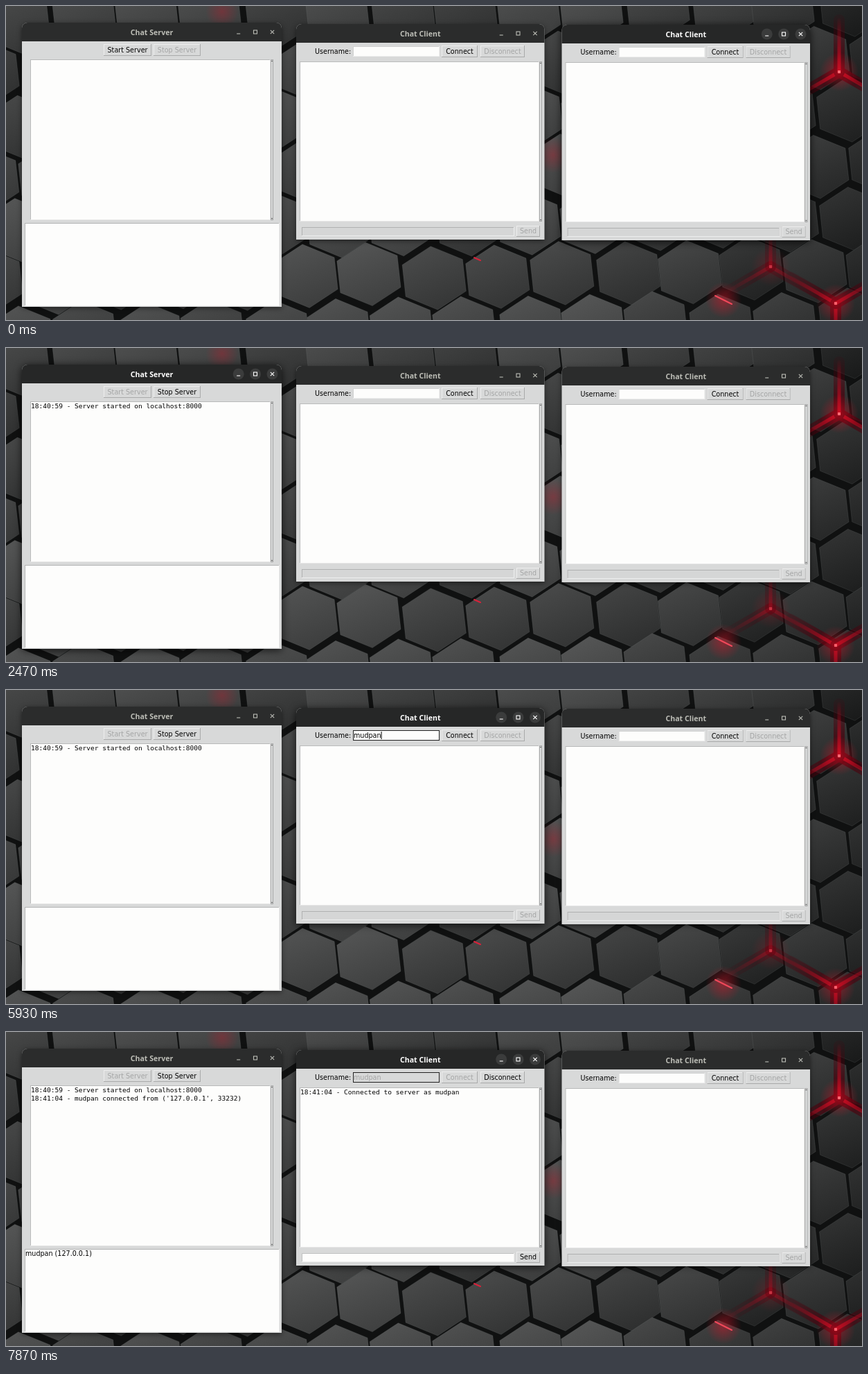
Write an HTML page with a canvas that moves like this. It is 1236 px wide and 453 px high and loops after 8000 ms.

```html
<!DOCTYPE html>
<html lang="en">
<head>
<meta charset="utf-8">
<title>Chat windows</title>
<style>
html, body { margin: 0; width: 100%; height: 100%; overflow: hidden; background: #141515; }
canvas { display: block; }
</style>
</head>
<body>
<canvas id="stage" width="1236" height="453"></canvas>
<script>
const W = 1236, H = 453, LOOP = 8000;
const USER = 'mudpan';
const SANS = '9.6px "DejaVu Sans", sans-serif';
const MONO = '9.54px "DejaVu Sans Mono", monospace';
const TITLE = 'bold 10.6px "Noto Sans", "Open Sans", sans-serif';
const FACE = '#d8d9d9', PAPER = '#fdfdfc', DIM = '#a4a5a5', INK = '#000';

// Times of the clicks and keys, in ms
const HOVER_START = 1570, PRESS_START = 1970, STARTED = 2370, FOCUS = 3230;
const FIRST_KEY = 5470, KEY_STEP = 92, LAST_KEY = FIRST_KEY + 5 * KEY_STEP;
const HOVER_CONNECT = 7000, PRESS_CONNECT = 7230, CONNECTED = 7430;

const stage = document.getElementById('stage');
let g = stage.getContext('2d');

function rect(x, y, w, h, color) {
  g.fillStyle = color;
  g.fillRect(x, y, w, h);
}

function text(str, x, y, font, color, align = 'left') {
  g.font = font;
  g.fillStyle = color;
  g.textAlign = align;
  g.fillText(str, x, y);
}

function line(x1, y1, x2, y2, color, width) {
  g.strokeStyle = color;
  g.lineWidth = width;
  g.beginPath();
  g.moveTo(x1, y1);
  g.lineTo(x2, y2);
  g.stroke();
}

// Box with a one pixel edge, light and dark sides
function bevel(x, y, w, h, fill, light, dark) {
  rect(x, y, w, h, dark);
  rect(x, y, w - 1, h - 1, light);
  rect(x + 1, y + 1, w - 2, h - 2, fill);
}

// ---- wallpaper ----
function randomizer(seed) {
  return () => (seed = (seed * 16807) % 2147483647) / 2147483647;
}

function hexagon(cx, cy, r, shade) {
  const gray = k => `rgb(${k},${k + 1},${k + 1})`;
  g.beginPath();
  for (let i = 0; i < 6; i++) {
    const a = Math.PI / 6 + i * Math.PI / 3 - 0.1;
    g.lineTo(cx + Math.cos(a) * r * 1.1, cy + Math.sin(a) * r);
  }
  g.closePath();
  const fill = g.createLinearGradient(cx - r * 0.4, cy - r, cx + r * 0.4, cy + r);
  fill.addColorStop(0, gray(shade + 8));
  fill.addColorStop(1, gray(shade - 14));
  g.fillStyle = fill;
  g.fill();
  g.strokeStyle = 'rgba(130,132,132,.18)';
  g.lineWidth = 1;
  g.stroke();
}

// Tilted honeycomb that darkens towards the right
function honeycomb() {
  const rnd = randomizer(11), dx = 92, dy = 76;
  for (let row = -5; row <= 1; row++) {
    for (let col = -10; col <= 5; col++) {
      const x = 803 + (col + (row & 1) / 2) * dx + rnd() * 8 - 4;
      const y = 386 + row * dy - col * 1.5 + rnd() * 8 - 4;
      const fade = Math.max(0, x - 850) / (W - 850);
      hexagon(x, y, 46, Math.round(60 + rnd() * 18 - 26 * fade));
    }
  }
}

function fading(x, y, r, rgb, alpha) {
  const c = g.createRadialGradient(x, y, 0, x, y, r);
  c.addColorStop(0, `rgba(${rgb},${alpha})`);
  c.addColorStop(1, `rgba(${rgb},0)`);
  return c;
}

function glow(x, y, r, alpha) {
  rect(x - r, y - r, 2 * r, 2 * r, fading(x, y, r, '215,20,40', alpha));
}

// Three lit gaps meeting in one corner
function junction(x, y, turn, power) {
  for (let i = 0; i < 3; i++) {
    const a = turn + i * Math.PI * 2 / 3;
    const x2 = x + Math.cos(a) * 75, y2 = y + Math.sin(a) * 75;
    line(x, y, x2, y2, fading(x, y, 95, '75,0,12', power), 16);
    line(x, y, x2, y2, fading(x, y, 80, '190,10,32', power), 5);
  }
  glow(x, y, 28, power * 0.6);
  rect(x - 2, y - 2, 4, 4, `rgba(255,110,120,${power})`);
}

function paintWallpaper() {
  const layer = document.createElement('canvas');
  layer.width = W;
  layer.height = H;
  const main = g;
  g = layer.getContext('2d');
  rect(0, 0, W, H, '#101111');
  honeycomb();

  g.lineCap = 'round';
  junction(1203, 95, Math.PI / 6, 0.95);
  junction(1104, 376, Math.PI / 6, 0.4);
  junction(1198, 429, Math.PI / 2, 0.85);
  glow(1036, 424, 26, 0.5);
  line(1024, 418, 1048, 430, '#f0485a', 2);
  line(676, 363, 685, 367, '#d8223a', 2);
  glow(312, 8, 24, 0.3);
  glow(790, 215, 26, 0.3);
  g = main;
  return layer;
}

// ---- widgets ----
function windowFrame(x, y, w, h, title, active) {
  g.save();
  g.shadowColor = active ? 'rgba(0,0,0,.75)' : 'rgba(0,0,0,.5)';
  g.shadowBlur = active ? 12 : 7;
  g.shadowOffsetY = 2;
  g.beginPath();
  g.roundRect(x, y, w, h, [8, 8, 0, 0]);
  g.fillStyle = FACE;
  g.fill();
  g.restore();

  g.beginPath();
  g.roundRect(x, y, w, 27, [8, 8, 0, 0]);
  g.fillStyle = active ? '#262727' : '#2b2c2c';
  g.fill();

  const ink = active ? '#fff' : '#bcbdb6';
  text(title, x + w / 2, y + 17.6, TITLE, ink, 'center');

  const cy = y + 13.5, right = x + w - 13.5;
  if (active) {
    for (let i = 0; i < 3; i++) {
      g.beginPath();
      g.arc(right - i * 24.4, cy, 8, 0, 7);
      g.fillStyle = '#3b3c3c';
      g.fill();
    }
  }
  line(right - 2.7, cy - 2.7, right + 2.7, cy + 2.7, ink, 1.1);
  line(right - 2.7, cy + 2.7, right + 2.7, cy - 2.7, ink, 1.1);
  g.strokeRect(right - 27, cy - 2.5, 5, 5);
  line(right - 51.3, cy + 2.5, right - 46.3, cy + 2.5, ink, 1.1);
}

function button(label, x, y, w, h, { enabled = true, hover = false, down = false } = {}) {
  const fill = hover ? '#ececec' : FACE;
  if (down) bevel(x, y, w, h, fill, '#c3c4c4', '#f4f4f4');
  else bevel(x, y, w, h, fill, '#ededed', '#a9aaaa');
  const shift = down ? 0.7 : 0;
  text(label, x + w / 2 + shift, y + h / 2 + 3.4 + shift / 2, SANS, enabled ? INK : DIM, 'center');
}

function logArea(x, y, w, h, lines) {
  bevel(x, y, w, h, PAPER, '#b9baba', '#e6e6e6');
  lines.forEach((s, i) => text(s, x + 1, y + 10 + i * 11.6, MONO, INK));
  const bar = x + w;
  bevel(bar, y, 4, h, '#d0d1d1', '#a9aaaa', '#a2a3a3');
  rect(bar + 1, y + 4, 2, h - 8, '#dcdddd');
  rect(bar + 1, y + 2, 2, 1, '#6d6e6e');
  rect(bar + 1, y + h - 3, 2, 1, '#6d6e6e');
}

function server(t) {
  const started = t >= STARTED, joined = t >= CONNECTED;
  windowFrame(23, 24, 375, 410, 'Chat Server', t >= PRESS_START && t < FOCUS);
  button('Start Server', 141, 55, 69, 17, {
    enabled: !started,
    hover: t >= HOVER_START && !started,
    down: t >= PRESS_START && !started
  });
  button('Stop Server', 213, 55, 68, 17, { enabled: started });

  const log = [];
  if (started) log.push('18:40:59 - Server started on localhost:8000');
  if (joined) log.push(`18:41:04 - ${USER} connected from ('127.0.0.1', 33232)`);
  logArea(35, 77, 347, 232, log);

  bevel(27, 313, 368, 120, PAPER, '#b4b5b5', '#efefef');
  if (joined) text(`${USER} (127.0.0.1)`, 28, 322.6, SANS, INK);
}

function client(dx, dy, s) {
  g.save();
  g.translate(dx, dy);
  windowFrame(419, 26, 358.5, 311, 'Chat Client', s.active);
  text('Username:', 446, 68.8, SANS, INK);

  const fill = s.joined ? FACE : PAPER;
  if (s.focused) bevel(501, 58, 125, 15, fill, '#222', '#222');
  else bevel(501, 58, 125, 15, fill, '#d0d1d1', '#eee');
  text(s.name, 502, 68.8, SANS, s.joined ? DIM : INK);
  if (s.caret) rect(502 + g.measureText(s.name).width, 60, 1, 11, INK);

  button('Connect', 629, 57, 52, 17, { enabled: !s.joined, hover: s.hover, down: s.down });
  button('Disconnect', 685, 57, 64, 17, { enabled: s.joined });
  logArea(424, 80, 346, 231, s.joined ? [`18:41:04 - Connected to server as ${USER}`] : []);

  if (s.joined) bevel(427, 319, 307, 13, PAPER, '#c0c1c1', '#efefef');
  else bevel(427, 319, 307, 13, '#d5d6d6', '#b0b1b1', '#ededed');
  button('Send', 737, 317, 34, 16, { enabled: s.joined });
  g.restore();
}

const wallpaper = paintWallpaper();

function draw(t) {
  const joined = t >= CONNECTED, focused = t >= FOCUS;
  const typed = t < FIRST_KEY ? 0 : Math.floor((t - FIRST_KEY) / KEY_STEP) + 1;
  const blinkFrom = t < FIRST_KEY ? FOCUS : LAST_KEY;

  g.drawImage(wallpaper, 0, 0);
  server(t);
  client(0, 0, {
    active: focused, focused, joined,
    name: USER.slice(0, typed),
    caret: focused && !joined && (t - blinkFrom) % 900 < 570,
    hover: t >= HOVER_CONNECT && !joined,
    down: t >= PRESS_CONNECT && !joined
  });
  client(383.5, 1, { active: t < PRESS_START, name: '', joined: false });
}

function tick() {
  draw(performance.now() % LOOP);
  requestAnimationFrame(tick);
}
tick();
</script>
</body>
</html>
```
